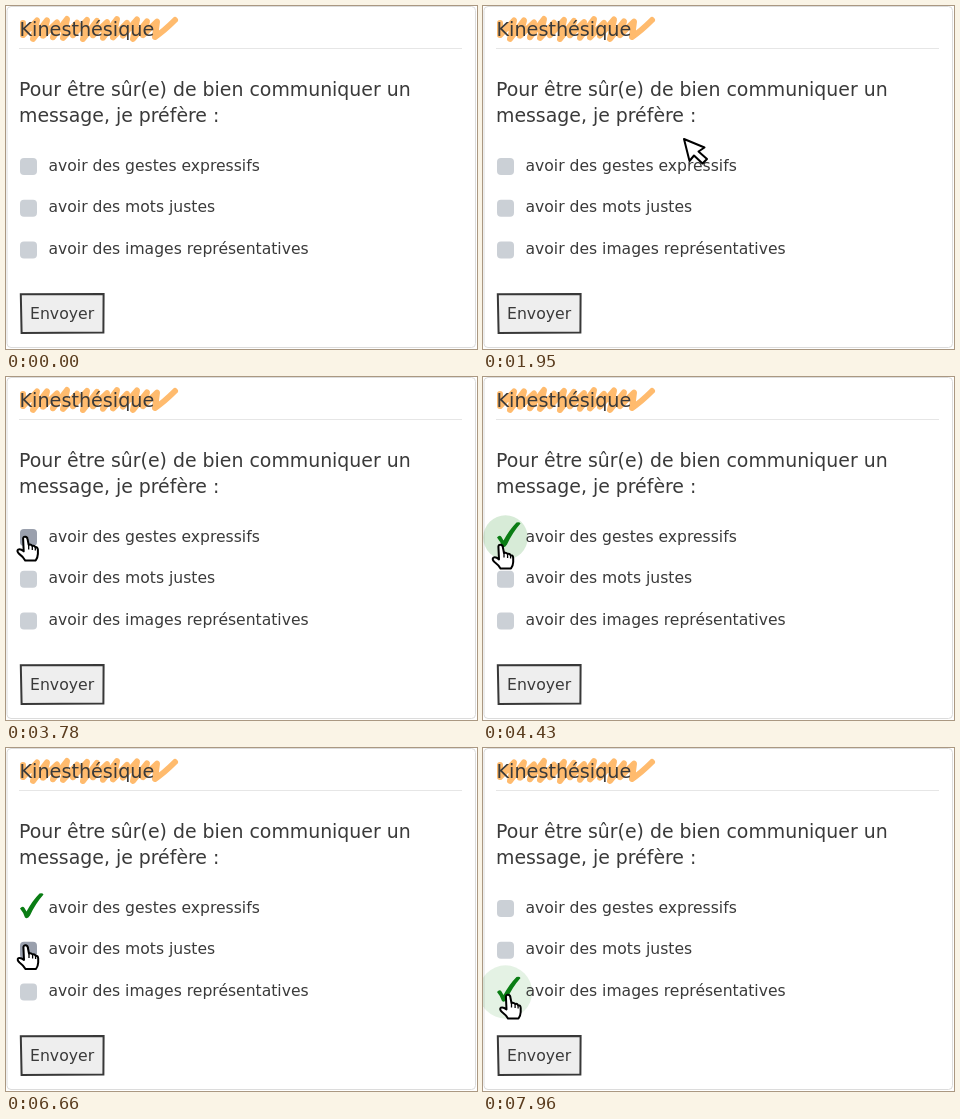
An HTML page that plays this animation: 471 by 343 pixels, repeating every 8000 ms.

```html
<!DOCTYPE html>
<html lang="fr">
<head>
<meta charset="utf-8">
<title>Kinesthésique</title>
<style>
  html, body { margin: 0; width: 100%; height: 100%; overflow: hidden; background: #fff; }
  svg { display: block; width: 471px; height: 343px; }
  text { font-family: "DejaVu Sans", sans-serif; fill: #3a3a3a; }
  .lead { font-size: 18.9px; }
  .option { font-size: 15.6px; }
</style>
</head>
<body>
<svg viewBox="0 0 471 343" xmlns="http://www.w3.org/2000/svg">
  <rect x="1" y="0.5" width="468.5" height="341" rx="4" fill="#fff" stroke="#dcdcdc"/>
  <path id="brush" fill="none" stroke="#ffbb6e" stroke-width="6" stroke-linecap="round" stroke-linejoin="round"/>
  <path d="M13 42.5H456" stroke="#e6e6e6"/>
  <text x="13.5" y="30" font-size="19.2">Kinesthésique</text>
  <text class="lead" x="13" y="89.5">Pour être sûr(e) de bien communiquer un</text>
  <text class="lead" x="13" y="115.5">message, je préfère :</text>
  <g id="options"></g>
  <path d="M14.8 288.2L97.6 288L97.4 326.4L15.6 327Z" fill="#eee" stroke="#383838" stroke-width="2"/>
  <text x="24" y="312.5" font-size="15.7">Envoyer</text>
  <g id="cursor" fill="#fff" stroke="#000" stroke-width="2" stroke-linejoin="round">
    <path id="arrow" d="M1 1L6.5 23L11 17.5L19.5 25.5L24 21L15.5 13.5L21.5 9.5Z"/>
    <g id="hand">
      <path d="M-2.6 2.6Q-2.4 .6 -.4 .8Q1.6 1 1.8 3L3 9Q5 8 6.6 10Q8.6 9.2 9.6 11.2Q12 11 12.2 14V18Q12 22 10 24.5H-.5Q-2.5 21 -6.5 18Q-9.5 15 -7.5 13.7Q-5.5 12.6 -2 15.4Z"/>
      <path d="M3 9V13.5M6.6 10.2V14M9.6 11.4V14.5" fill="none" stroke-width="1.3"/>
    </g>
  </g>
</svg>
<script>
const LOOP = 8000;
const STEP = 130; // each pose is held this long
const FIRST_CLICK = 4370;
const LAST_CLICK = 7800;
const RIPPLE = 290;

const $ = id => document.getElementById(id);
const show = (el, on) => el.setAttribute('visibility', on ? 'visible' : 'hidden');
const smooth = k => k * k * (3 - 2 * k);

function add(parent, tag, attrs) {
  const el = document.createElementNS('http://www.w3.org/2000/svg', tag);
  for (const key in attrs) el.setAttribute(key, attrs[key]);
  return parent.appendChild(el);
}

// Highlighter scribble behind the title
let scribble = 'M17 17';
for (let x = 17; x < 140; x += 10) {
  scribble += `L${x} ${31 + 2 * Math.sin(x)}L${x + 14} ${15 + 2 * Math.cos(x)}`;
}
$('brush').setAttribute('d', scribble + 'L149 31Q158 25 169 14');

const options = [
  { label: 'avoir des gestes expressifs', on: FIRST_CLICK, off: LAST_CLICK },
  { label: 'avoir des mots justes', on: LOOP, off: LOOP },
  { label: 'avoir des images représentatives', on: LAST_CLICK, off: LOOP }
];

options.forEach((o, i) => {
  o.y = 160.5 + 41.75 * i;
  const g = add($('options'), 'g', { transform: `translate(22.5 ${o.y})` });
  o.box = add(g, 'rect', { x: -8.5, y: -8.5, width: 17, height: 17, rx: 4 });
  o.ripple = add(g, 'circle', { fill: 'green' });
  o.tick = add(g, 'path', {
    d: 'M-8.5 0Q-6 -3 -4 -.5L-2 3Q4 -8 11 -15Q14 -16 15 -14Q7 -5 1.5 7Q-1 11 -3.5 9Q-5 4 -8.5 0Z',
    fill: '#0a7d14'
  });
  add(g, 'text', { class: 'option', x: 20, y: 4 }).textContent = o.label;
});

// Pointer stops; it eases from one to the next
const stops = [
  { t: 180, x: -28, y: 140 },
  { t: 1300, x: 118, y: 127 },
  { t: 1950, x: 200, y: 132 },
  { t: 3000, x: 22, y: 148 },
  { t: 4400, x: 18, y: 167 },
  { t: 5300, x: 20, y: 156 },
  { t: 6200, x: 20, y: 196.5 },
  { t: 6900, x: 20, y: 196.5 },
  { t: 7700, x: 25.5, y: 246 }
];

function pointerAt(t) {
  const next = stops.findIndex(s => s.t > t);
  if (next < 0) return stops[stops.length - 1];
  const b = stops[next], a = stops[next - 1] || b;
  const k = a === b ? 0 : smooth((t - a.t) / (b.t - a.t));
  return { x: a.x + (b.x - a.x) * k, y: a.y + (b.y - a.y) * k };
}

function drawOption(o, t, hover) {
  const checked = t >= o.on && t < o.off;
  const age = Math.max(0, t - o.on);
  o.box.setAttribute('fill', hover ? '#9aa0ad' : '#cbd0d6');
  o.ripple.setAttribute('r', 19.5 + 0.055 * age);
  o.ripple.setAttribute('opacity', Math.max(0, 0.19 * (1 - age / RIPPLE)));
  show(o.box, !checked);
  show(o.tick, checked);
  show(o.ripple, checked && age < RIPPLE);
}

function draw(t) {
  const { x, y } = pointerAt(t);
  const target = options.find(o => Math.hypot(x - 22.5, y - o.y) < 11);
  for (const o of options) drawOption(o, t, o === target);
  $('cursor').setAttribute('transform', `translate(${x} ${y})`);
  show($('arrow'), !target);
  show($('hand'), target);
}

function frame() {
  const t = performance.now() % LOOP;
  draw(Math.floor(t / STEP) * STEP);
  requestAnimationFrame(frame);
}
frame();
</script>
</body>
</html>
```
